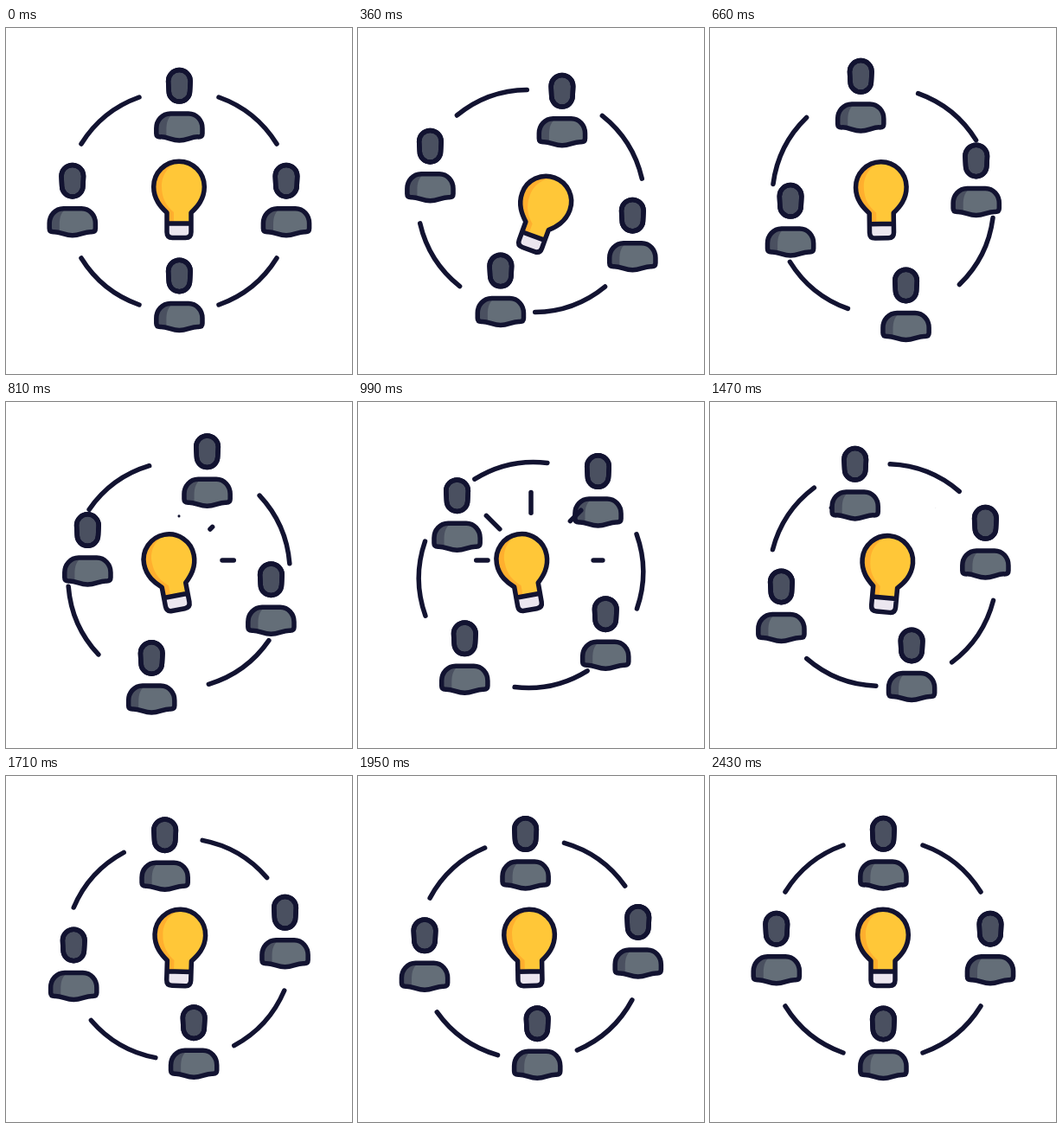
An HTML page for the animation above (3460 ms loop, 400 by 400 pixels).

```html
<!DOCTYPE html>
<html lang="en">
<head>
<meta charset="utf-8">
<title>Team idea</title>
<style>
  @property --head { syntax: "<number>"; inherits: false; initial-value: 0; }
  @property --tail { syntax: "<number>"; inherits: false; initial-value: 0; }

  html, body { margin: 0; width: 100%; height: 100%; overflow: hidden; background: #fff; }
  svg { display: block; width: 100%; height: 100%; }

  .ink { fill: none; stroke: #121331; stroke-width: 5.5px; stroke-linecap: round; stroke-linejoin: round; }
  .grey { fill: #646e78; }
  .slate { fill: #4a5060; }
  .yellow { fill: #ffc738; }
  .orange { fill: #ffaf2e; }
  .lilac { fill: #ebe6ef; }

  .ring, .orbit, .upright { animation: turn 3460ms infinite; }
  .ring { transform-origin: 200px 200px; }
  .orbit { transform-origin: 200.4px 176.7px; }
  .upright { transform-origin: 0 0; animation-name: unturn; }

  @keyframes turn {
    0% { rotate: 0deg; animation-timing-function: cubic-bezier(.333, 0, .127, 1); }
    70.231%, 100% { rotate: 180deg; }
  }
  @keyframes unturn {
    0% { rotate: 0deg; animation-timing-function: cubic-bezier(.333, 0, .127, 1); }
    70.231%, 100% { rotate: -180deg; }
  }

  .bulb {
    transform-origin: 200px 243px;
    animation: swing 3460ms cubic-bezier(.45, 0, .55, 1) infinite,
               dip 3460ms ease-in-out infinite;
  }
  @keyframes swing {
    0% { rotate: 0deg; }
    10.405% { rotate: 20deg; }
    25.145% { rotate: -11.5deg; }
    41.62% { rotate: 5.2deg; }
    56.36% { rotate: -1deg; }
    70.231%, 100% { rotate: 0deg; }
  }
  @keyframes dip {
    0% { translate: 0 0; }
    10.405% { translate: -3px 13.5px; animation-timing-function: ease-in; }
    19.075% { translate: -1.4px .5px; animation-timing-function: ease-out; }
    25.145% { translate: -.4px -2.8px; }
    41.62% { translate: 0 .2px; }
    56.36% { translate: -.9px 0; }
    70.231%, 100% { translate: 0 0; }
  }

  /* each ray is a dash running from --tail to --head */
  .ray {
    stroke-dasharray: calc((var(--head) - var(--tail)) * 1px + .02px) 99px;
    stroke-dashoffset: calc(var(--tail) * -1px);
    animation: head 3460ms infinite both, tail 3460ms infinite both, weight 3460ms linear infinite both;
    animation-delay: calc(702ms + var(--i) * 45ms);
  }
  @keyframes head {
    0% { --head: 0; animation-timing-function: cubic-bezier(.333, 0, .127, 1); }
    12.43%, 100% { --head: 35; }
  }
  @keyframes tail {
    0%, 3.9% { --tail: 0; animation-timing-function: cubic-bezier(.333, 0, .127, 1); }
    16.33%, 100% { --tail: 35; }
  }
  @keyframes weight {
    0% { stroke-width: 0px; }
    1%, 16.7% { stroke-width: 5.5px; }
    21.04%, 100% { stroke-width: 0px; }
  }
</style>
</head>
<body>
<svg viewBox="0 0 400 400">
  <defs>
    <g id="person">
      <path id="face" class="slate" d="M-12.8-5.5A12.8 12.8 0 0 1 12.8-5.5L12.2 6A12.2 12.2 0 0 1-12.2 6Z"/>
      <path class="grey" d="M2.5-18.3C-3-15-4-8-4 0C-4 8-2 15 2.5 18.3C8 18 12 13 12.2 6L12.8-5.5C12.8-13 8-18 2.5-18.3Z"/>
      <use href="#face" style="fill:none" class="ink"/>
      <path class="ink" d="M-12.8-5.5A12.8 12.8 0 0 1 12.8-5.5L12.2 6A12.2 12.2 0 0 1-12.2 6Z"/>
      <path class="slate" d="M-10.4 32H10.6C20 32 26.6 40 26.6 49V55Q26.6 59 22 59C14 58.5 9 63 0 63C-9 63-14 58.5-22 59Q-26.6 59-26.6 55V49C-26.6 40-20 32-10.4 32Z"/>
      <path class="grey" d="M-5 32H10.6C20 32 26.6 40 26.6 49V55Q26.6 59 22 59C14 58.5 9 63 0 63C-7 63-10 60-15 59V51C-15 42-13 34-5 32Z"/>
      <path class="ink" d="M-10.4 32H10.6C20 32 26.6 40 26.6 49V55Q26.6 59 22 59C14 58.5 9 63 0 63C-9 63-14 58.5-22 59Q-26.6 59-26.6 55V49C-26.6 40-20 32-10.4 32Z"/>
    </g>
  </defs>

  <g class="ring ink">
    <path d="M87 134A130 130 0 0 1 154 80"/>
    <path d="M246 80A130 130 0 0 1 313 134"/>
    <path d="M313 266A130 130 0 0 1 246 320"/>
    <path d="M154 320A130 130 0 0 1 87 266"/>
  </g>

  <g class="bulb">
    <path class="orange" d="M186 226V213.5C179 207 170.7 198 170.7 183.5A29.3 29.3 0 0 1 229.3 183.5C229.3 198 221 207 214 213.5V226Z"/>
    <path class="yellow" d="M204 154.5C190 156 180 168 180 183C180 198 186 206 194 213V226H214V213.5C221 207 229.3 198 229.3 183.5C229.3 168 218 156 204 154.5Z"/>
    <path class="lilac" d="M186 226H214V236Q214 242.5 207.5 242.5H192.5Q186 242.5 186 236Z"/>
    <path class="ink" d="M186 226V213.5C179 207 170.7 198 170.7 183.5A29.3 29.3 0 0 1 229.3 183.5C229.3 198 221 207 214 213.5V226ZV236Q186 242.5 192.5 242.5H207.5Q214 242.5 214 236V226"/>
  </g>

  <g class="orbit">
    <g transform="translate(200.4 66.9)"><use class="upright" href="#person"/></g>
    <g transform="translate(324 176.7)"><use class="upright" href="#person"/></g>
    <g transform="translate(200.4 286.5)"><use class="upright" href="#person"/></g>
    <g transform="translate(76.8 176.7)"><use class="upright" href="#person"/></g>
  </g>

  <g>
    <path class="ink ray" style="--i:0" d="M250 183H285"/>
    <path class="ink ray" style="--i:1" d="M236 147L261 122"/>
    <path class="ink ray" style="--i:2" d="M200 132V97"/>
    <path class="ink ray" style="--i:3" d="M164 147L139 122"/>
    <path class="ink ray" style="--i:4" d="M150 183H115"/>
  </g>
</svg>
</body>
</html>
```
